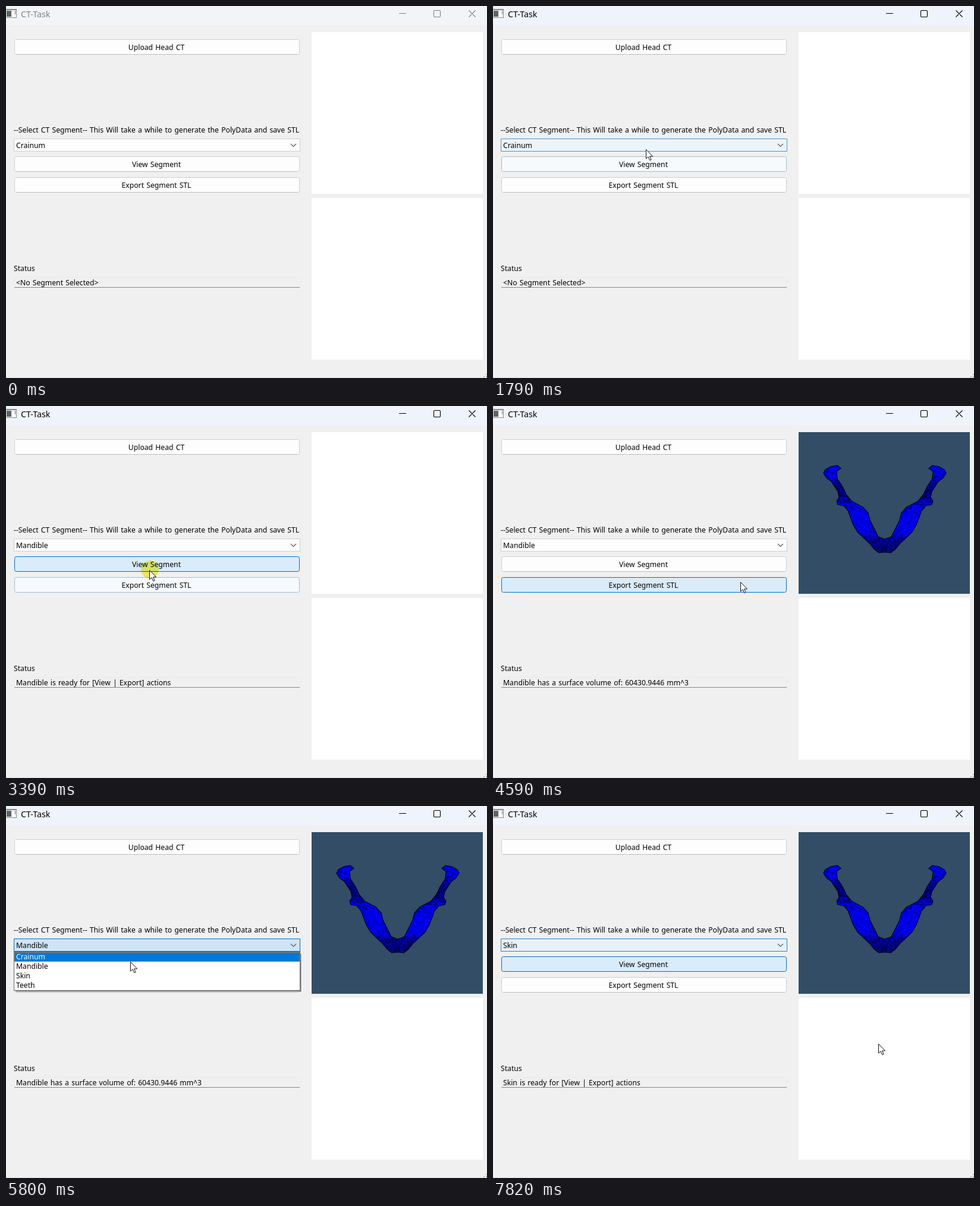
Animation, 809 px wide and 626 px high, one loop 8 s. Source, as an HTML page with a canvas:

```html
<!DOCTYPE html>
<html lang="en">
<head>
<meta charset="utf-8">
<title>CT-Task</title>
<style>
html, body { margin: 0; width: 100%; height: 100%; overflow: hidden; background: #f0f0f0; }
canvas { display: block; }
</style>
</head>
<body>
<canvas id="stage" width="809" height="626"></canvas>
<script>
const LOOP = 8000, STEP = 200;
const ctx = document.getElementById('stage').getContext('2d');
const segments = ['Crainum', 'Mandible', 'Skin', 'Teeth'];
const clicks = [2000, 2600, 3400, 5600, 6600, 7000];
const viewTime = 4600, busyTime = 7100;

// Pointer waypoints: time, x, y.
const waypoints = [
  [100, 300, 612], [1000, 277, 340], [1400, 271, 294], [1800, 257, 241], [2200, 255, 236],
  [2600, 247, 269], [2800, 244, 266], [3200, 243, 291], [3400, 241, 276], [3600, 290, 306],
  [4200, 416, 296], [4600, 416, 296], [5000, 762, 191], [5600, 212, 238], [5800, 209, 262],
  [6600, 212, 285], [6800, 235, 267], [7400, 238, 267], [7600, 402, 250], [7800, 648, 400]
];

function cursorAt(t) {
  const i = waypoints.findIndex(p => p[0] >= t);
  const [tb, xb, yb] = waypoints[i], [ta, xa, ya] = waypoints[Math.max(0, i - 1)];
  const u = tb > ta ? (t - ta) / (tb - ta) : 1;
  return [xa + (xb - xa) * u, ya + (yb - ya) * u];
}

const popupOpen = t => (t >= 2000 && t <= 2600) || (t >= 5600 && t <= 6600);
const selected = t => t < 2800 ? 0 : t < 6800 ? 1 : 2;

// Hover tint rises quickly under the pointer, fades slowly, and freezes while busy.
function hover(top, height, t, isCombo) {
  let level = 0;
  for (let s = STEP; s <= Math.min(t, busyTime); s += STEP) {
    const [x, y] = cursorAt(s), open = popupOpen(s);
    const inside = !open && x > 13 && x < 495 && y > top && y < top + height;
    if (isCombo && open) level = 1;
    else if (inside) level = Math.min(.75, level + .38);
    else level = Math.max(0, level - .25);
  }
  return level;
}

function mix(a, b, u) {
  return `rgb(${a.map((v, i) => Math.round(v + (b[i] - v) * u))})`;
}

function rect(x, y, w, h, fill) {
  ctx.fillStyle = fill;
  ctx.fillRect(x, y, w, h);
}

function stroke(path, color, width = 1) {
  ctx.strokeStyle = color;
  ctx.lineWidth = width;
  ctx.stroke(path);
}

function text(s, x, y, align = 'left', color = '#000', size = 12.2) {
  ctx.font = `${size}px "Noto Sans", "Open Sans", sans-serif`;
  ctx.wordSpacing = '1px';
  ctx.textAlign = align;
  ctx.fillStyle = color;
  ctx.fillText(s, x, y);
}

function box(x, y, w, h, r, level) {
  const p = new Path2D();
  p.roundRect(x + .5, y + .5, w - 1, h - 1, r);
  ctx.fillStyle = mix([253, 253, 253], [206, 229, 247], level);
  ctx.fill(p);
  stroke(p, mix([206, 206, 206], [0, 110, 198], Math.min(1, level * 1.6)));
}

function button(label, y, level = 0) {
  box(14, y, 480, 26, 3, level);
  if (!level) rect(17, y + 25, 474, 1, '#bcbcbc');
  text(label, 253, y + 18, 'center');
}

function titleBar(active) {
  rect(0, 0, 809, 32, mix([242, 244, 246], [239, 243, 251], active));
  const ink = mix([128, 128, 128], [0, 0, 0], active);
  rect(0, 5, 18, 15, '#888');
  rect(0, 7, 17, 12, '#f5f5f5');
  rect(1, 8, 8, 10, '#5c6464');
  rect(10, 8, 4, 10, '#fff');
  rect(15, 8, 1, 6, '#777');
  text('CT-Task', 25, 19, 'left', ink, 14.2);
  const icons = new Path2D('M661 12.5h12M778.5 7.5l11 11m0-11l-11 11');
  icons.roundRect(719.5, 7.5, 11, 11, 1.5);
  stroke(icons, ink, 1.1);
}

function randomizer(seed) {
  return () => (seed = seed * 16807 % 2147483647) / 2147483647;
}

// Left half of the bone; the right half mirrors it about x = 659.
const halfJaw = new Path2D(`M659 224L648 220 641 206 634 192 631 180 622 170 603 160 594 149
  588 136 579 122 578 110 585 105 579 100 568 102 559 107 556 113 561 121 569 127 580 144
  582 154 578 160 580 166 590 168 597 176 606 200 613 212 633 231 641 241 649 247 659 246`);

function drawHalfJaw(rnd) {
  ctx.save();
  ctx.fillStyle = '#0000f4';
  ctx.fill(halfJaw);
  ctx.save();
  ctx.clip(halfJaw);
  const shade = y => Math.cos((y - 142) / 95 * 2 * Math.PI);
  for (let y = 100; y < 248; y++) {
    rect(556, y, 104, 1, `rgba(0,0,35,${Math.max(0, shade(y)) * .5})`);
  }
  for (let i = 0; i < 1100; i++) {
    const x = 556 + rnd() * 103, y = 100 + rnd() * 147;
    const angle = y > 215 ? 1.5 + rnd() * .5 : rnd() * 1.4 - .2;
    const length = 2 + rnd() * 5;
    const p = new Path2D();
    p.moveTo(x, y);
    p.lineTo(x + Math.cos(angle) * length, y + Math.sin(angle) * length);
    stroke(p, `rgba(0,0,25,${.55 + .3 * shade(y)})`, .6 + rnd() * .9);
  }
  ctx.restore();
  ctx.lineJoin = 'round';
  stroke(halfJaw, '#00001e', 1.2);
  ctx.restore();
}

function drawJaw() {
  const rnd = randomizer(71);
  drawHalfJaw(rnd);
  ctx.save();
  ctx.transform(-1, 0, 0, 1, 1318, 0);
  drawHalfJaw(rnd);
  ctx.restore();
}

function popup(highlight) {
  rect(17, 249, 480, 64, 'rgba(0,0,0,.2)');
  rect(16, 248, 480, 64, 'rgba(0,0,0,.35)');
  rect(13, 245, 482, 66, '#646464');
  rect(14, 246, 480, 64, '#fff');
  segments.forEach((name, i) => {
    const on = i === highlight, y = 246 + 16 * i;
    if (on) {
      rect(14, y, 480, 16, '#0078d7');
      ctx.setLineDash([1, 1]);
      const focus = new Path2D();
      focus.rect(14.5, y + .5, 479, 15);
      stroke(focus, '#ff8728');
      ctx.setLineDash([]);
    }
    text(name, 17, y + 12, 'left', on ? '#fff' : '#000');
  });
}

function clickMark(x, y) {
  ctx.save();
  ctx.globalCompositeOperation = 'multiply';
  ctx.fillStyle = '#f7f56c';
  ctx.beginPath();
  ctx.arc(x, y, 15, 0, Math.PI * 2);
  ctx.fill();
  ctx.restore();
}

const arrow = new Path2D('M.5.5v15.5l3.6-3.3 2.6 6 2.4-1-2.5-5.8h5z');
function pointer(x, y) {
  ctx.save();
  ctx.translate(x, y);
  ctx.fillStyle = '#fff';
  ctx.fill(arrow);
  stroke(arrow, '#111');
  ctx.restore();
}

function statusText(t) {
  const i = selected(t);
  if (i === 0) return '<No Segment Selected>';
  if (i === 1 && t >= viewTime) return 'Mandible has a surface volume of: 60430.9446 mm^3';
  return segments[i] + ' is ready for [View | Export] actions';
}

function draw(t) {
  rect(0, 0, 809, 626, '#f0f0f0');
  titleBar(Math.min(1, Math.max(0, (t - 800) / 400)));

  button('Upload Head CT', 56);
  text('--Select CT Segment-- This Will take a while to generate the PolyData and save STL', 13, 213);
  box(13, 223, 482, 22, 0, hover(223, 22, t, true));
  text(segments[selected(t)], 17, 239);
  stroke(new Path2D('M479 232l4.5 4.5 4.5-4.5'), '#555', 1.1);
  button('View Segment', 253, hover(253, 26, t));
  button('Export Segment STL', 288, hover(288, 26, t));

  text('Status', 13, 446);
  rect(14, 456, 481, 18, '#eaeaea');
  rect(15, 457, 479, 16, '#f0f0f0');
  rect(14, 473, 480, 1, '#868686');
  text(statusText(t), 17, 470);

  const viewed = t >= viewTime;
  rect(514, 44, 288, 272, viewed ? '#334d66' : '#fff');
  if (viewed) drawJaw();
  rect(514, 323, 288, 272, '#fff');
  rect(0, 625, 809, 1, '#dfdfdf');
  for (const [x, y] of [[807, 619], [807, 623], [803, 623]]) rect(x, y, 2, 2, '#b8b8b8');

  if (t < 100) return;
  const [x, y] = cursorAt(t);
  if (popupOpen(t)) popup(Math.max(0, Math.floor((y - 247) / 16)));
  if (clicks.includes(t)) clickMark(x + 1, y - 1);
  pointer(x, y);
}

function snap(t) {
  if (t < 100) return 0;
  return Math.min(7800, Math.max(100, Math.floor((t + 20) / STEP) * STEP));
}

let shown = -1;
function frame(now) {
  const t = snap(now % LOOP);
  if (t !== shown) draw(shown = t);
  requestAnimationFrame(frame);
}
requestAnimationFrame(frame);
</script>
</body>
</html>
```
